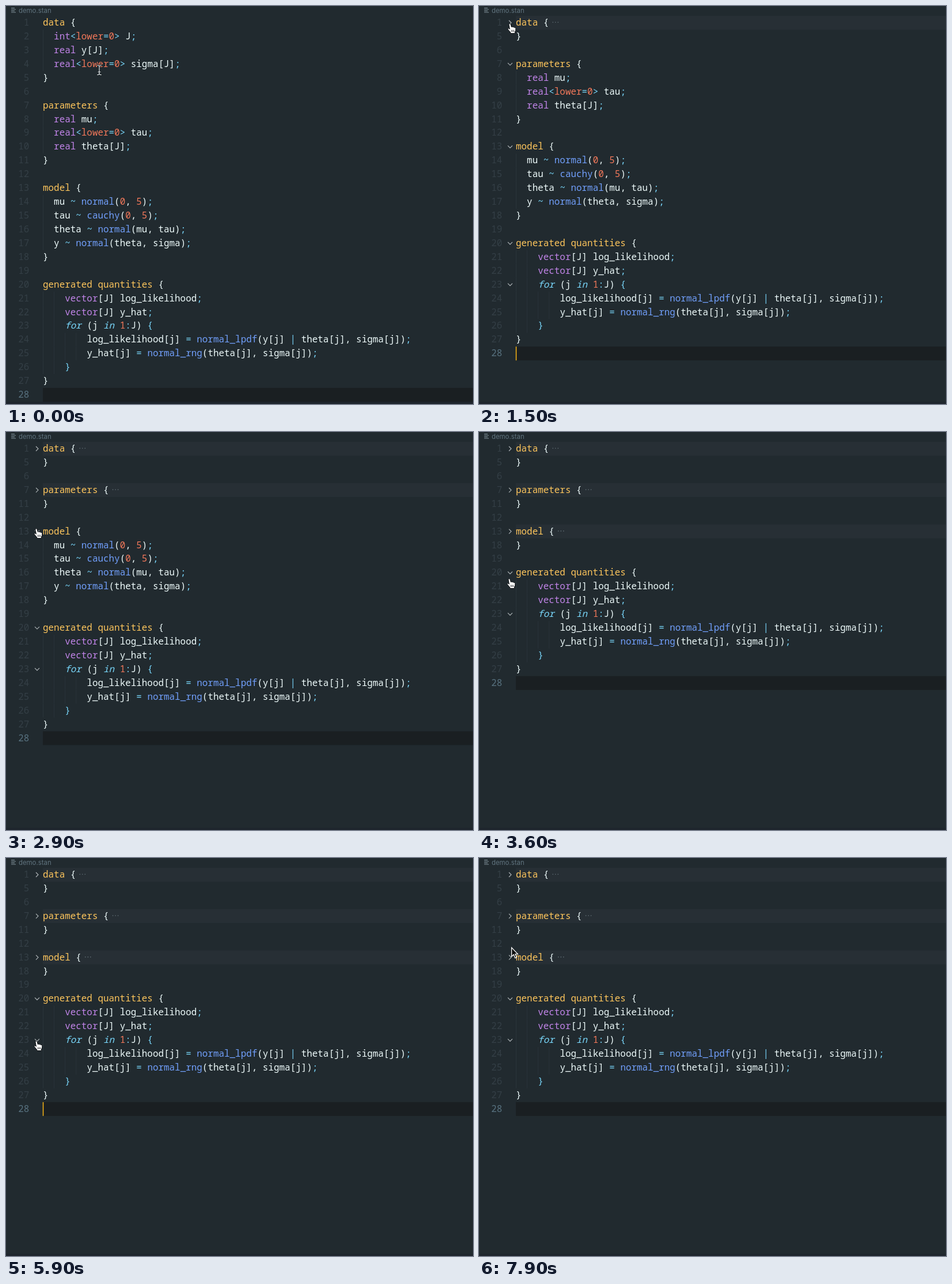
Recreate the animation shown at these times as an HTML page. Size 811 by 691 pixels, loop 8 s.

```html
<!DOCTYPE html>
<html lang="en">
<head>
<meta charset="utf-8">
<title>Code folding</title>
<style>
  html, body { margin: 0; width: 100%; height: 100%; overflow: hidden; background: #212a2f; }
  svg { display: block; width: 811px; height: 691px; }
  text { white-space: pre; }
  .code { font: 15.92px "Noto Sans Mono", "DejaVu Sans Mono", monospace; font-variant-ligatures: none; fill: #eefbfb; }
  .num { text-anchor: end; fill: #343f46; }
  .num.active { fill: #587280; }
  .block { fill: #fdc55c; }
  .type { fill: #c184e8; }
  .word { fill: #79d7fb; font-style: italic; }
  .func { fill: #719ffb; }
  .const { fill: #f2785a; }
  .op { fill: #79d7fb; }
  .guide { fill: #2a343a; }
  .chevron { fill: none; stroke: #b4babd; stroke-width: 1.1; }
  .dots { fill: #66747b; }
</style>
</head>
<body>
<svg id="stage" viewBox="0 0 811 691" xmlns="http://www.w3.org/2000/svg">
  <rect width="811" height="691" fill="#212a2f"/>
  <rect y="687" width="811" height="4" fill="#1e252d"/>
  <path d="M9 3.5h6M9 6h8M9 8.5h6M9 11h8" stroke="#82939c"/>
  <text x="22" y="11.7" font-family="Inter, sans-serif" font-size="11.4" fill="#60747f">demo.stan</text>
  <g id="rows"></g>
  <rect id="caret" x="63.8" width="1.5" height="24" fill="#fbb614"/>
  <g id="mouse">
    <g id="beam" fill="none" stroke-linecap="round">
      <path d="M-3.5-8Q0-8 0-5.5V6Q0 8.5-3.5 8.5M3.5-8Q0-8 0-5.5M0 6Q0 8.5 3.5 8.5M-2 3.5H2" stroke="#11181c" stroke-width="2.6"/>
      <path d="M-3.5-8Q0-8 0-5.5V6Q0 8.5-3.5 8.5M3.5-8Q0-8 0-5.5M0 6Q0 8.5 3.5 8.5M-2 3.5H2" stroke="#e6ecee" stroke-width="1.2"/>
    </g>
    <g id="hand" stroke="#0c1013" stroke-linejoin="round">
      <path d="M-2 1.5C-2-.6.6-.8 1.1 1L2.3 5.6C3.3 4.6 4.6 4.9 5 6C6 5.2 7.2 5.6 7.5 6.7C8.8 6 9.8 6.8 9.8 8.2C10 11 9.2 12.4 8.4 14V16.5H.8V15C-.8 13.2-2 11.4-3.6 9.8C-4.6 8.4-3.2 7.2-1.8 8.2L-.6 9.2Z" fill="#fff"/>
      <path d="M2.3 10.5V14M4.4 10.5V14M6.5 10.5V14" stroke-width=".8"/>
    </g>
    <path id="arrow" d="M0 0V15.5L3.6 12.2 6.2 18.2 8.8 17.1 6.3 11.3H10.8Z" fill="#080a0b" stroke="#fff" stroke-width="1.3"/>
  </g>
</svg>
<script>
const LOOP = 8000, LEFT = 64, TOP = 17, ROW = 23.93, COL = 9.55;
const NS = "http://www.w3.org/2000/svg";
const $ = id => document.getElementById(id);

const lines = `data {
  int<lower=0> J;
  real y[J];
  real<lower=0> sigma[J];
}

parameters {
  real mu;
  real<lower=0> tau;
  real theta[J];
}

model {
  mu ~ normal(0, 5);
  tau ~ cauchy(0, 5);
  theta ~ normal(mu, tau);
  y ~ normal(theta, sigma);
}

generated quantities {
    vector[J] log_likelihood;
    vector[J] y_hat;
    for (j in 1:J) {
        log_likelihood[j] = normal_lpdf(y[j] | theta[j], sigma[j]);
        y_hat[j] = normal_rng(theta[j], sigma[j]);
    }
}
`.split("\n");

// head line, last hidden line, time closed, time opened again
const folds = [
  [1, 4, 1450, LOOP],
  [7, 10, 2100, LOOP],
  [13, 17, 3000, LOOP],
  [20, 26, 4100, 4400],
  [23, 25, 5400, 5900]
].map(([head, last, shut, open]) => ({ head, last, shut, open }));

const blinks = [50, 550, 1050, 1550, 2050, 2550, 3050, 3550,
  4050, 4900, 5400, 5920, 6400, 6890, 7380, 7870];

// time, x, y of the pointer's hot spot
const path = [
  [0, 162, 111], [100, 162, 111], [900, 60, 40], [1300, 54, 31], [1550, 54, 31],
  [2000, 53, 97], [2350, 53, 97], [2900, 53, 168], [3200, 53, 168],
  [3600, 53, 255], [3750, 53, 255], [4000, 53, 249], [4700, 53, 249],
  [5200, 53, 318], [7200, 53, 318], [7900, 56.6, 155.5], [8000, 56.6, 155.5]
];

const rules = [
  ["block", /^(data|parameters|model|generated quantities)(?= \{)/],
  ["type", /^(int|real|vector)\b/],
  ["word", /^(for|in)\b/],
  ["func", /^(normal\w*|cauchy)/],
  ["const", /^(lower\b|\d)/],
  ["op", /^[<>=~;:|]/],
  ["", /^(\w+|[^\w])/]
];

function add(parent, tag, attrs, text) {
  const el = document.createElementNS(NS, tag);
  for (const key in attrs) el.setAttribute(key, attrs[key]);
  if (text) el.textContent = text;
  return parent.appendChild(el);
}

function addCode(parent, line) {
  const text = add(parent, "text", { x: LEFT, y: 17, class: "code" });
  const nested = line.startsWith("    ");
  for (let rest = line; rest;) {
    const [kind, rule] = rules.find(([, r]) => r.test(rest));
    const word = rest.match(rule)[0];
    const brace = nested && /[{}]/.test(word);
    add(text, "tspan", { class: brace ? "op" : kind }, word);
    rest = rest.slice(word.length);
  }
}

const rows = lines.map((line, i) => {
  const n = i + 1, active = n === lines.length;
  const g = add($("rows"), "g", {});
  const fold = folds.find(f => f.head === n);
  const row = { n, g, fold };
  if (active) add(g, "rect", { x: LEFT, width: 747, height: 24, fill: "#1a1f22" });
  if (fold) row.band = add(g, "rect", { x: LEFT, width: 747, height: 24, fill: "#272f35" });
  const indent = line.search(/\S/);
  for (let c = 0; c < indent; c += 2)
    add(g, "rect", { x: LEFT + c * COL, width: 1, height: ROW, class: "guide" });
  add(g, "text", { x: 40.3, y: 17, class: active ? "code num active" : "code num" }, String(n));
  addCode(g, line);
  if (fold) {
    row.down = add(g, "path", { d: "M50 10l4 4 4-4", class: "chevron" });
    row.right = add(g, "path", { d: "M52 8l4 4-4 4", class: "chevron" });
    row.dots = add(g, "g", { class: "dots" });
    for (const dx of [7, 11.5, 16])
      add(row.dots, "circle", { cx: LEFT + line.length * COL + dx, cy: 11.3, r: 0.8 });
  }
  return row;
});

const show = (el, on) => el.setAttribute("visibility", on ? "inherit" : "hidden");

function pointerAt(t) {
  const i = path.findIndex(p => p[0] > t);
  const [t0, x0, y0] = path[i - 1], [t1, x1, y1] = path[i];
  const u = (t - t0) / (t1 - t0), e = u * u * (3 - 2 * u);
  return [x0 + (x1 - x0) * e, y0 + (y1 - y0) * e];
}

function draw(t) {
  const closed = folds.filter(f => t >= f.shut && t < f.open);
  const [x, y] = pointerAt(t);
  const fade = Math.min(1, Math.max(0, (t - 750) / 500));
  let top = TOP, overFold = false;

  for (const row of rows) {
    const hidden = closed.some(f => row.n > f.head && row.n <= f.last);
    show(row.g, !hidden);
    if (hidden) continue;
    row.g.setAttribute("transform", `translate(0 ${top.toFixed(2)})`);
    if (row.fold) {
      const shut = closed.includes(row.fold);
      show(row.band, shut);
      show(row.right, shut);
      show(row.dots, shut);
      show(row.down, !shut);
      row.down.setAttribute("opacity", fade);
      if (y >= top && y < top + ROW) overFold = true;
    }
    top += ROW;
  }

  $("caret").setAttribute("y", top - ROW);
  show($("caret"), blinks.filter(b => b <= t).length % 2 === 1);

  const inText = x > LEFT;
  show($("beam"), inText);
  show($("hand"), !inText && overFold);
  show($("arrow"), !inText && !overFold);
  $("mouse").setAttribute("transform", `translate(${x.toFixed(2)} ${y.toFixed(2)})`);
}

const start = performance.now();
function tick() {
  draw((performance.now() - start) % LOOP);
  requestAnimationFrame(tick);
}
tick();
</script>
</body>
</html>
```
